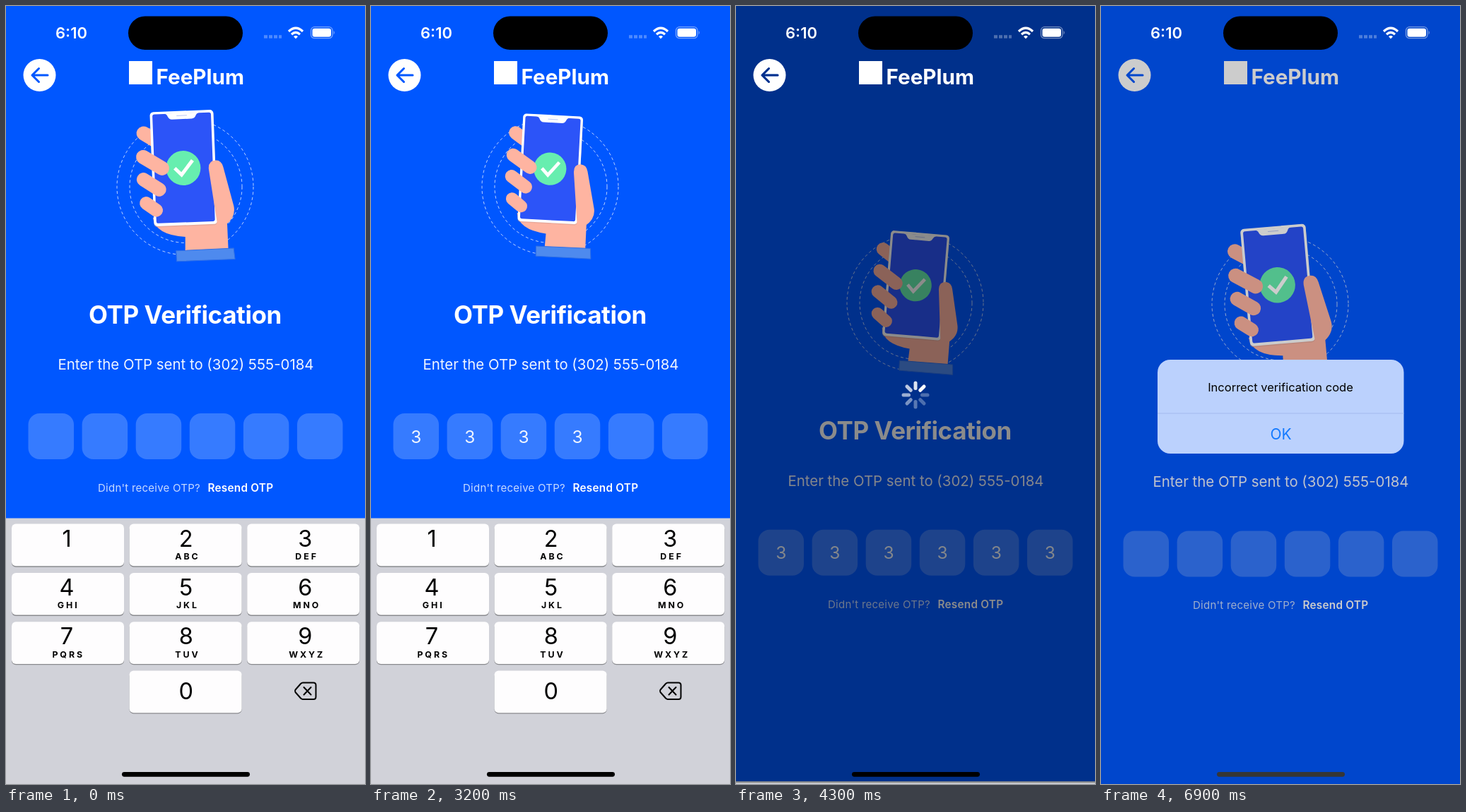
Write an HTML page that moves like this. It is 508 px wide and 1102 px high and loops after 7 s.

```html
<!DOCTYPE html>
<html lang="en">
<head>
<meta charset="utf-8">
<title>OTP Verification</title>
<style>
html, body { margin: 0; width: 100%; height: 100%; overflow: hidden; background: #fff; }
svg { display: block; width: 508px; height: 1102px; font-family: Inter, Roboto, sans-serif; }
text { fill: #fff; }
.mid { text-anchor: middle; }
.dark text { fill: #000; }
.skin { fill: #feb4a1; }
.finger { stroke: #feb4a1; stroke-linecap: round; }
</style>
</head>
<body>
<svg viewBox="0 0 508 1102">
  <rect width="508" height="1102" fill="#fff"/>
  <rect id="page" width="508" height="726" fill="#0057ff"/>

  <g id="content">
    <g fill="none" stroke="#fff" stroke-opacity=".75" stroke-dasharray="4 3.5">
      <circle cx="253.5" cy="256" r="96.5"/>
      <circle cx="254.5" cy="256" r="79.5"/>
    </g>
    <g id="hand">
      <path class="finger" d="M194.5 180.5L212 191" stroke-width="20"/>
      <path class="skin" d="M208 300Q212 325 254 327V348L315 345L313 302Z"/>
      <path d="M241 347L322.5 343L324.5 358.5L242 362Z" fill="#4e8aee" stroke="#2f6fe6"/>
      <g transform="translate(251.5 229.5) rotate(-2.3)">
        <rect x="-45" y="-80.5" width="90" height="163" rx="5" fill="#d9a096" opacity=".6"/>
        <rect x="-45" y="-81" width="90" height="162" rx="5" fill="#fff"/>
        <rect x="-41.5" y="-77.5" width="83" height="154.5" rx="3" fill="#2c54f8"/>
        <path d="M-25 -78H25Q21 -77 20 -74Q18 -69.5 14 -69.5H-14Q-18 -69.5 -20 -74Q-21 -77 -25 -78Z" fill="#fff"/>
        <path d="M-7 -74.5H7" stroke="#b9c6f5" stroke-linecap="round"/>
      </g>
      <circle cx="251" cy="229.5" r="24.5" fill="#67eeaf"/>
      <path d="M238.8 229.8L248.6 239L264 218.5" fill="none" stroke="#fff" stroke-width="5"/>
      <path class="finger" d="M194 214L221 230" stroke-width="20"/>
      <path class="finger" d="M194.7 246L217 260" stroke-width="19.5"/>
      <path class="finger" d="M198.5 279.5L213 289.5" stroke-width="18.5"/>
      <path class="skin" d="M287 231Q286 219 297 218.5Q305 218.5 307.5 228L322.5 283Q326 298 312 309.5L299.5 310Z"/>
    </g>
    <text class="mid" x="253.5" y="449.5" font-size="35" font-weight="700" letter-spacing="-.4">OTP Verification</text>
    <text class="mid" x="254.5" y="515" font-size="20.4" fill-opacity=".94">Enter the OTP sent to (302) 555-0184</text>
    <g id="cells"></g>
    <text x="130" y="688" font-size="15" letter-spacing=".25" fill-opacity=".78">Didn't receive OTP?</text>
    <text x="285.5" y="688" font-size="15.3" font-weight="600" letter-spacing=".25">Resend OTP</text>
  </g>

  <rect id="busy" width="508" height="1102" opacity="0"/>

  <g id="header">
    <circle cx="47.5" cy="98" r="23" fill="#fff"/>
    <g fill="none" stroke-width="3" stroke-linecap="round" stroke-linejoin="round">
      <path d="M59 98H37M46.5 88.5L37 98L46.5 107.5" stroke="#0057ff"/>
      <path id="arrowDim" d="M59 98H37M46.5 88.5L37 98L46.5 107.5" stroke="#000" opacity="0"/>
    </g>
    <rect x="174" y="78" width="33" height="33" fill="#fff"/>
    <text x="212.5" y="111" font-size="29.6" font-weight="700">FeePlum</text>
  </g>

  <g id="spinner" stroke="#fff" stroke-width="5" stroke-linecap="round" transform="translate(254 551)"></g>

  <g id="board" class="dark">
    <rect y="725.5" width="508" height="377" fill="#d1d2d9"/>
    <g id="keys"></g>
    <path d="M420 958.5H435Q438.5 958.5 438.5 962V978.5Q438.5 982 435 982H420Q418.5 982 417 980.5L409.5 972Q408.5 970.3 409.5 968.5L417 960Q418.5 958.5 420 958.5ZM421.5 965L431.5 975.5M431.5 965L421.5 975.5"
      fill="none" stroke="#000" stroke-width="2" stroke-linecap="round" stroke-linejoin="round"/>
  </g>

  <rect id="shade" width="508" height="1102" opacity="0"/>

  <g id="alert" class="dark">
    <rect x="80" y="501" width="348.5" height="133" rx="18" fill="#bbd1fd"/>
    <path d="M80 577H428.5" stroke="#a3b9ef"/>
    <text class="mid" x="254" y="546" font-size="16.5">Incorrect verification code</text>
    <text class="mid" x="254.5" y="614" font-size="21" style="fill:#147aff">OK</text>
  </g>

  <g id="status">
    <text class="mid" x="92.5" y="46" font-size="22" font-weight="600">6:10</text>
    <rect x="173" y="14.5" width="162" height="47.5" rx="23.75"/>
    <path d="M365 43.5H390" stroke="#fff" stroke-opacity=".3" stroke-width="4.5" stroke-dasharray="5 2"/>
    <g fill="none" stroke="#fff" stroke-width="3.3">
      <path d="M400 36Q410 26.5 420 36"/>
      <path d="M404 40.2Q410 34.8 416 40.2"/>
    </g>
    <path d="M407 43.2Q410 40.6 413 43.2L410 46.5Z" fill="#fff"/>
    <rect x="431.5" y="29.7" width="30.5" height="16" rx="5" fill="none" stroke="#fff" stroke-opacity=".45" stroke-width="1.3"/>
    <rect x="433.5" y="31.7" width="26.5" height="12" rx="3.3" fill="#fff"/>
    <path d="M463.7 35Q466 37.7 463.7 40.5Z" fill="#fff" opacity=".5"/>
  </g>
  <rect id="home" x="164" y="1085" width="181" height="6.7" rx="3.35"/>
</svg>

<script>
const LOOP = 7000;
const TAPS = [1700, 1960, 2500, 2950, 3400, 3780];
const TAP_LENGTH = 100;
const CLEAR = 4550;
const KEYBOARD = 376;
const LETTERS = ['', 'ABC', 'DEF', 'GHI', 'JKL', 'MNO', 'PQRS', 'TUV', 'WXYZ'];

const $ = id => document.getElementById(id);
const set = (node, name, value) => node.setAttribute(name, value);

function add(parent, tag, attrs, label) {
  const node = document.createElementNS('http://www.w3.org/2000/svg', tag);
  for (const name in attrs) set(node, name, attrs[name]);
  if (label) node.textContent = label;
  parent.appendChild(node);
  return node;
}

// Labels are spaced a little wider than the keys themselves.
function addKey(digit, col, row) {
  const x = 8 + col * 166.6, y = 733.6 + row * 69.3, mid = 86 + col * 168.7;
  const box = { x, width: 159, height: 59.7, rx: 6 };
  add($('keys'), 'rect', { ...box, y: y + 1.4, fill: '#898a8e' });
  const face = add($('keys'), 'rect', { ...box, y, fill: '#fefdfe' });
  add($('keys'), 'text', { class: 'mid', x: mid, y: y + (digit ? 32 : 40.5), 'font-size': 32.5 }, String(digit));
  const letters = LETTERS[digit - 1];
  if (letters) {
    add($('keys'), 'text', { class: 'mid', x: mid + 2.2, y: y + 50.3, 'font-size': 12.4,
      'font-weight': 700, 'letter-spacing': 2.9 }, letters);
  }
  return face;
}

const faces = LETTERS.map((_, i) => addKey(i + 1, i % 3, Math.floor(i / 3)));
addKey(0, 1, 3);

const digits = TAPS.map((_, i) => {
  const x = 31.5 + i * 76.1;
  add($('cells'), 'rect', { x, y: 577, width: 64.5, height: 65, rx: 16, fill: '#fff', opacity: .21 });
  return add($('cells'), 'text', { class: 'mid', x: x + 32.3, y: 618.7, 'font-size': 24.5,
    'fill-opacity': .92 }, '3');
});

const blades = Array.from({ length: 8 }, (_, i) =>
  add($('spinner'), 'path', { d: 'M0 -9.5V-17', transform: `rotate(${i * 45})` }));

const ramp = (t, from, to) => Math.min(1, Math.max(0, (t - from) / (to - from)));
const smooth = x => x * x * (3 - 2 * x);

function spring(t) {
  const x = Math.max(0, t) * .0214;
  return 1 - (1 + x) * Math.exp(-x);
}

function drawHand(t) {
  const tilt = -5 * Math.cos(2 * Math.PI * (t - 1070) / 6000);
  const size = (1 - .011 * tilt) / 1.025;
  set($('hand'), 'transform',
    `translate(${252.4 + .45 * tilt} ${229.9 + .23 * tilt}) rotate(${tilt + 2.3}) scale(${size}) translate(-251.5 -229.4)`);
}

function drawEntry(t) {
  digits.forEach((d, i) => set(d, 'opacity', t >= TAPS[i] && t < CLEAR ? 1 : 0));
  const down = TAPS.some(tap => t >= tap && t < tap + TAP_LENGTH);
  set(faces[2], 'fill', down ? '#bcc0ca' : '#fefdfe');
}

function drawLayout(t) {
  const grow = smooth(ramp(t, 4000, 4320)) * KEYBOARD;
  set($('page'), 'height', 726 + grow);
  set($('content'), 'transform', `translate(0 ${grow * .4425})`);
  const drop = spring(t - 3960) * (KEYBOARD + 1);
  set($('board'), 'transform', `translate(0 ${drop})`);
}

function drawBusy(t) {
  const on = ramp(t, 3880, 4030) * (1 - ramp(t, 4520, 4640));
  set($('busy'), 'opacity', on * .455);
  set($('arrowDim'), 'opacity', on * .455);
  set($('spinner'), 'opacity', on);
  const lead = Math.floor(t / 100) + 6;
  blades.forEach((b, i) => set(b, 'opacity', Math.max(.3, 1 - .13 * ((lead - i) % 8))));
}

function drawAlert(t) {
  const on = smooth(ramp(t, 4600, 4850));
  set($('shade'), 'opacity', on * .2);
  set($('alert'), 'opacity', on);
  const size = 1.15 - .15 * on;
  set($('alert'), 'transform', `translate(254 567.5) scale(${size}) translate(-254 -567.5)`);
  const tone = Math.round(54 * on);
  set($('home'), 'fill', `rgb(${tone},${tone},${tone})`);
}

const start = performance.now();
function frame() {
  const t = (performance.now() - start) % LOOP;
  for (const draw of [drawHand, drawEntry, drawLayout, drawBusy, drawAlert]) draw(t);
  requestAnimationFrame(frame);
}
frame();
</script>
</body>
</html>
```
